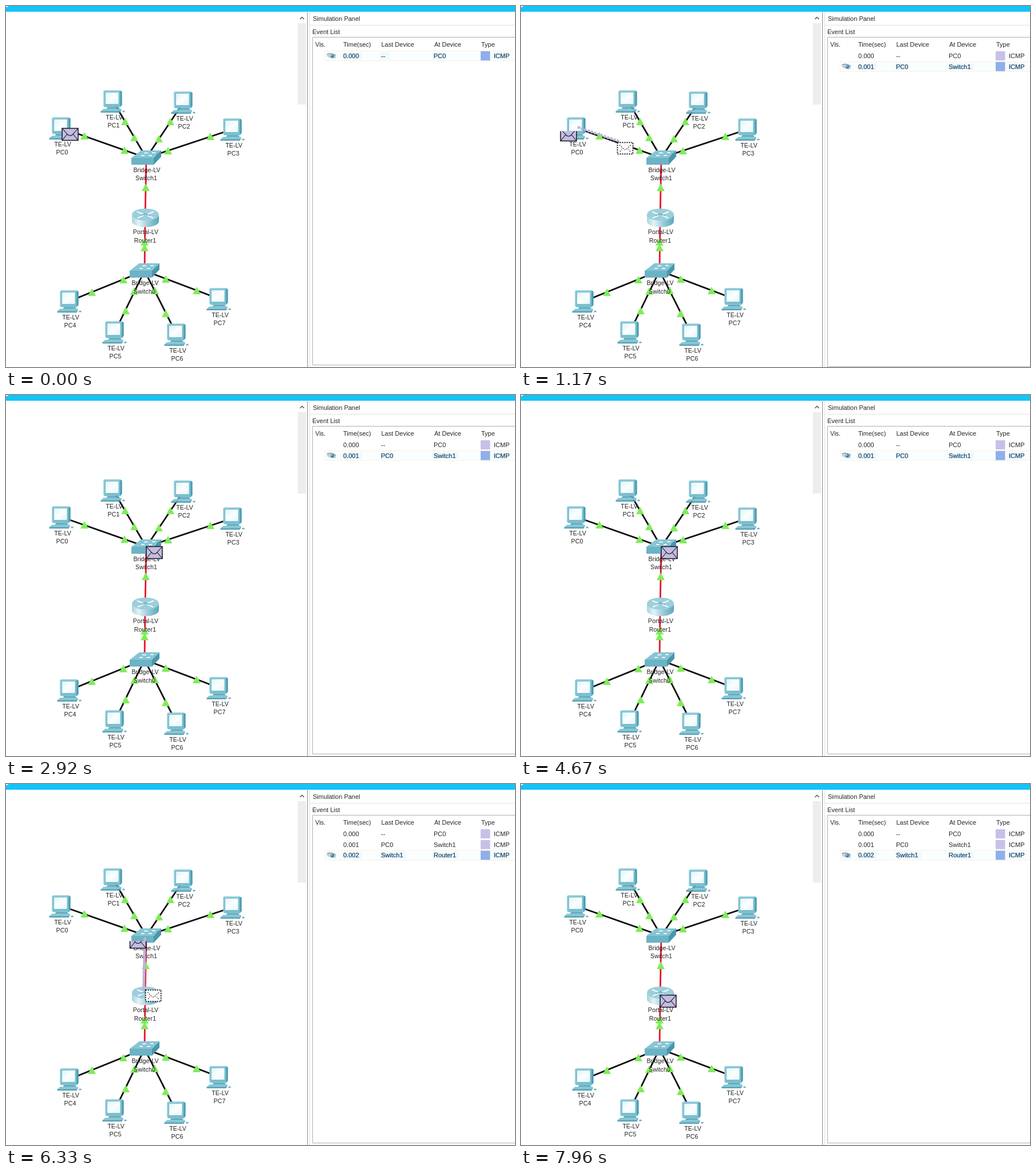
Animation, 889 px wide and 630 px high, one loop 8 s. Source, as an HTML page:

```html
<!DOCTYPE html>
<html lang="en">
<head>
<meta charset="utf-8">
<title>Packet simulation</title>
<style>
html, body { margin: 0; width: 100%; height: 100%; overflow: hidden; background: #fff; }
svg { display: block; width: 889px; height: 630px; }
text { font-family: "Liberation Sans", Arial, sans-serif; font-size: 11px; fill: #262626; }
.label { font-size: 10.6px; letter-spacing: .1px; text-anchor: middle; fill: #222; }
.on text { fill: #153a5e; stroke: #153a5e; stroke-width: .2px; }
</style>
</head>
<body>
<svg id="stage" viewBox="0 0 889 630" xmlns="http://www.w3.org/2000/svg">
  <defs>
    <linearGradient id="body">
      <stop offset="0" stop-color="#a5d3df"/><stop offset=".25" stop-color="#e3f3f7"/>
      <stop offset=".6" stop-color="#9accd9"/><stop offset="1" stop-color="#5ba7bb"/>
    </linearGradient>
    <linearGradient id="screen" x2="1" y2="1">
      <stop offset="0" stop-color="#e0f4f8"/><stop offset=".5" stop-color="#fafefe"/>
      <stop offset="1" stop-color="#e6f5f8"/>
    </linearGradient>
    <g id="pc">
      <path d="M5 1L7 0H34L37 2V25L34 29H7L5 27Z" fill="#79bfd0"/>
      <path d="M34 0L37 2V25L34 29Z" fill="#4b9bb0"/>
      <path d="M5 1L7 0H34L32 2.5H7V27H5Z" fill="#8fcbd9"/>
      <rect x="8" y="3" width="23.5" height="21" rx="1.5" fill="url(#screen)" stroke="#62aec1" stroke-width=".7"/>
      <path d="M12 29H31L34 32H10Z" fill="#5aa6ba"/>
      <path d="M5 32H36L34 36H0Z" fill="#84c5d4"/>
      <path d="M0 36H34L36 32V34.5L34 38.5H0Z" fill="#4f9fb4"/>
      <ellipse cx="40" cy="36.5" rx="2.4" ry="1.6" fill="#6cb4c6"/>
    </g>
    <g id="switch">
      <path d="M0 13L17 0H52L39 13Z" fill="#86c5d3"/>
      <path d="M39 13L52 0V11L39 25Z" fill="#4897ac"/>
      <rect y="13" width="39" height="12" fill="#6bb3c5"/>
      <path d="M22 4.5H29M36 4H42M17 9H23M30 9H36" fill="none" stroke="#e6f5f8" stroke-width="1.8"/>
    </g>
    <g id="router">
      <path d="M0 11V23A23.5 10 0 0 0 47 23V11Z" fill="url(#body)"/>
      <ellipse cx="23.5" cy="11" rx="23.5" ry="10.5" fill="#9ccfdb"/>
      <path d="M9 6L20 10.5M38 6L27 10.5M20 12.5L10 17M27 12.5L37 17" fill="none" stroke="#eff8fa" stroke-width="2.4"/>
      <path d="M15 13L23 9.5L32 13" fill="none" stroke="#5a9fb1" stroke-width="1.2"/>
    </g>
    <g id="mail" stroke="#17151f" stroke-width="1.5">
      <rect x="-14" y="-10.5" width="28" height="21" fill="#c4bce1"/>
      <path d="M-14 -10.5L-4 .5Q0 4 4 .5L14 -10.5M-14 10.5L-5 -.5M14 10.5L5 -.5" fill="none" stroke-width="1.1"/>
    </g>
    <g id="ghost" stroke="#111" stroke-dasharray="2 2">
      <rect x="-13.5" y="-10" width="27" height="20" fill="#fff" stroke-width="2"/>
      <path d="M-10 -6L-3 1Q0 4 3 1L10 -6M-9 6L-6 2M9 6L6 2" fill="none" stroke-width="1.1"/>
    </g>
    <clipPath id="outClip"><rect id="outBox" x="-16" width="32"/></clipPath>
    <clipPath id="inClip"><rect id="inBox" x="-16" y="-12" width="32"/></clipPath>
  </defs>

  <rect width="889" height="630" fill="#fff"/>
  <g id="net"></g>
  <path id="trail" fill="none" stroke="#bfb2da" stroke-width="5" stroke-linecap="round"/>
  <g id="out"><use href="#mail" clip-path="url(#outClip)"/></g>
  <g id="in"><use href="#mail" clip-path="url(#inClip)"/></g>
  <use id="dash" href="#ghost"/>

  <rect x="509.5" y="30" width="14.5" height="142" fill="#ededed"/>
  <path d="M513.5 23L517 19.5L520.5 23" fill="none" stroke="#555" stroke-width="1.5"/>
  <rect x="525" y="10" width="364" height="620" fill="#fff"/>
  <rect x="526" y="11" width="1" height="619" fill="#8a8a8a"/>
  <path d="M530.5 11V630M530 33.5H889" stroke="#e2e2e2" fill="none"/>
  <path id="frame" fill="none" stroke="#b0b0b0"/>
  <text x="536" y="26">Simulation Panel</text>
  <text x="535" y="48.5">Event List</text>
  <g id="table"></g>
  <rect width="889" height="10" fill="#14c4f8"/>
  <path d="M0 0H5L2 2H0Z" fill="#e8f9ff"/>
</svg>
<script>
const $ = id => document.getElementById(id);
const LOOP = 8000;
const set = (el, attrs) => { for (const k in attrs) el.setAttribute(k, attrs[k]); };
const ramp = (t, a, b) => Math.max(0, Math.min(1, (t - a) / (b - a)));
const mix = (p, q, k) => [p[0] + (q[0] - p[0]) * k, p[1] + (q[1] - p[1]) * k];
const place = (el, p) => set(el, { transform: `translate(${p[0]} ${p[1]})` });
const show = (el, on) => set(el, { visibility: on ? 'visible' : 'hidden' });
const text = (x, y, s, cls = '') => `<text x="${x}" y="${y}" class="${cls}">${s}</text>`;

// Network
const pcs = [[76, 195], [166, 148], [289, 150], [375, 197], [90, 497], [169, 551], [277, 555], [351, 493]];
const top1 = [245, 265], mid = [243, 370], low = [242, 462];
const lights = [
  [137, 227], [207, 252], [208, 202], [224, 230], [287, 202], [267, 232], [357, 228], [283, 253],
  [244, 317], [242, 412], [242, 422],
  [205, 478], [150, 500], [224, 498], [209, 532], [260, 497], [279, 537], [279, 477], [333, 497]
];
const link = (a, b, c) => `<path d="M${a}L${b}" stroke="${c}" stroke-width="2.8"/>`;
const icon = (id, x, y) => `<use href="#${id}" x="${x}" y="${y}"/>`;
const label = (x, y, kind, name) => text(x, y, kind, 'label') + text(x - 1, y + 14.5, name, 'label');

let net = link(top1, mid, '#e8132f') + link(mid, low, '#e8132f');
pcs.forEach(([x, y], i) => net += link([x + 21, y + 18], i < 4 ? top1 : low, '#0c0c0c'));
pcs.forEach(([x, y]) => net += icon('pc', x - .5, y - .5));
net += icon('switch', 219, 252) + icon('switch', 216, 449) + icon('router', 220, 353);
lights.forEach(([x, y]) => net += `<path d="M${x} ${y - 7}l7 13h-14Z" fill="#7fec59"/>`);
pcs.forEach(([x, y], i) => net += label(x + 23, y + 49.5, 'TE-LV', 'PC' + i));
net += label(246, 289.5, 'Bridge-LV', 'Switch1') + label(244, 398, 'Portal-LV', 'Router1')
  + label(243, 487, 'Bridge-LV', 'Switch0');
$('net').innerHTML = net;

// Event table
const cols = [589, 655, 747, 852];
const events = [['0.000', '--', 'PC0', 'ICMP'], ['0.001', 'PC0', 'Switch1', 'ICMP'], ['0.002', 'Switch1', 'Router1', 'ICMP']];
const eye = y => `<path d="M560 ${y - 4}Q568 ${y - 7} 576 ${y - 2}V${y + 4}Q568 ${y + 6} 561 ${y + 1}Z" fill="#bcd3df"/>
  <path d="M561 ${y - 3}Q569 ${y - 6} 576 ${y}" fill="none" stroke="#7d9dae" stroke-width="1.2"/>
  <circle cx="570" cy="${y + .5}" r="3" fill="#4f7a92"/><circle cx="569" cy="${y - .5}" r="1" fill="#e7f3f8"/>`;
let table = text(540, 70.5, 'Vis.') + text(589, 70.5, 'Time(sec)') + text(655.5, 70.5, 'Last Device')
  + text(748, 70.5, 'At Device') + text(830, 70.5, 'Type');
events.forEach((row, i) => {
  const y = 87 + i * 18.7;
  table += `<g class="row"><g class="mark"><rect x="557.5" y="${y - 8.5}" width="340" height="17" fill="#fafeff" stroke="#f6f1dc"/>`
    + cols.map((x, c) => `<rect x="${x - 2}" y="${y - 6}" width="${row[c].length * 6 + 4}" height="12" fill="#edf9fe"/>`).join('')
    + eye(y) + `</g><rect class="chip" x="829" y="${y - 8}" width="16.5" height="16"/>`
    + row.map((s, c) => text(cols[c], y + 4, s)).join('') + '</g>';
});
$('table').innerHTML = table;
const rows = [...document.querySelectorAll('.row')];

// Each hop: outline runs ahead, the sender drains, the receiver fills
const hops = [
  { go: 650, arrive: 1745, drain: [1010, 1835], tail: 2340, fill: [1700, 2180], reset: 1570,
    side: [83, 225], from: [112, 224], to: [259, 275], path: [[101, 212], [240, 260]], gap: 6 },
  { go: 5330, arrive: 6433, drain: [5740, 7165], tail: 7830, fill: [6433, 7830], reset: 6240,
    side: [230.5, 276], from: [259, 275], to: [257, 379], path: [[242.5, 270], [240.5, 360]], gap: 3.5 }
];

function render(t) {
  const n = hops.filter(h => t >= h.go).length;
  const h = hops[n - 1];
  rows.forEach((r, i) => {
    const on = i === n;
    show(r, i <= n);
    r.classList.toggle('on', on);
    show(r.querySelector('.mark'), on);
    set(r.querySelector('.chip'), { fill: on ? '#8fafea' : '#c8c0e8' });
  });
  const bottom = h && t < h.reset ? 629.5 : 626.5;
  set($('frame'), { d: `M889 54.5H535.5V${bottom}H889` });

  let left = 1, filled = 0;
  if (h) {
    left = 1 - ramp(t, ...h.drain);
    filled = ramp(t, ...h.fill);
    const k = ramp(t, h.go, h.arrive);
    const head = mix(...h.path, Math.min(1, k * 1.08));
    const tail = mix(...h.path, ramp(t, h.drain[1], h.tail));
    set($('trail'), { d: `M${tail}L${head}`, 'stroke-dasharray': `0 ${h.gap}` });
    show($('trail'), t < h.tail);
    place($('dash'), mix(h.from, h.to, k));
    place($('in'), h.to);
  } else show($('trail'), false);
  place($('out'), h ? h.side : hops[0].from);
  show($('dash'), h && t < h.arrive);
  show($('out'), left > 0);
  show($('in'), filled > 0);
  const cut = left === 1 ? -12 : 10.5 - 21 * left;
  set($('outBox'), { y: cut, height: 12 - cut });
  set($('inBox'), { height: filled === 1 ? 24 : 1.5 + 21 * filled });
}

const start = performance.now();
function tick() {
  render((performance.now() - start) % LOOP);
  requestAnimationFrame(tick);
}
tick();
</script>
</body>
</html>
```
